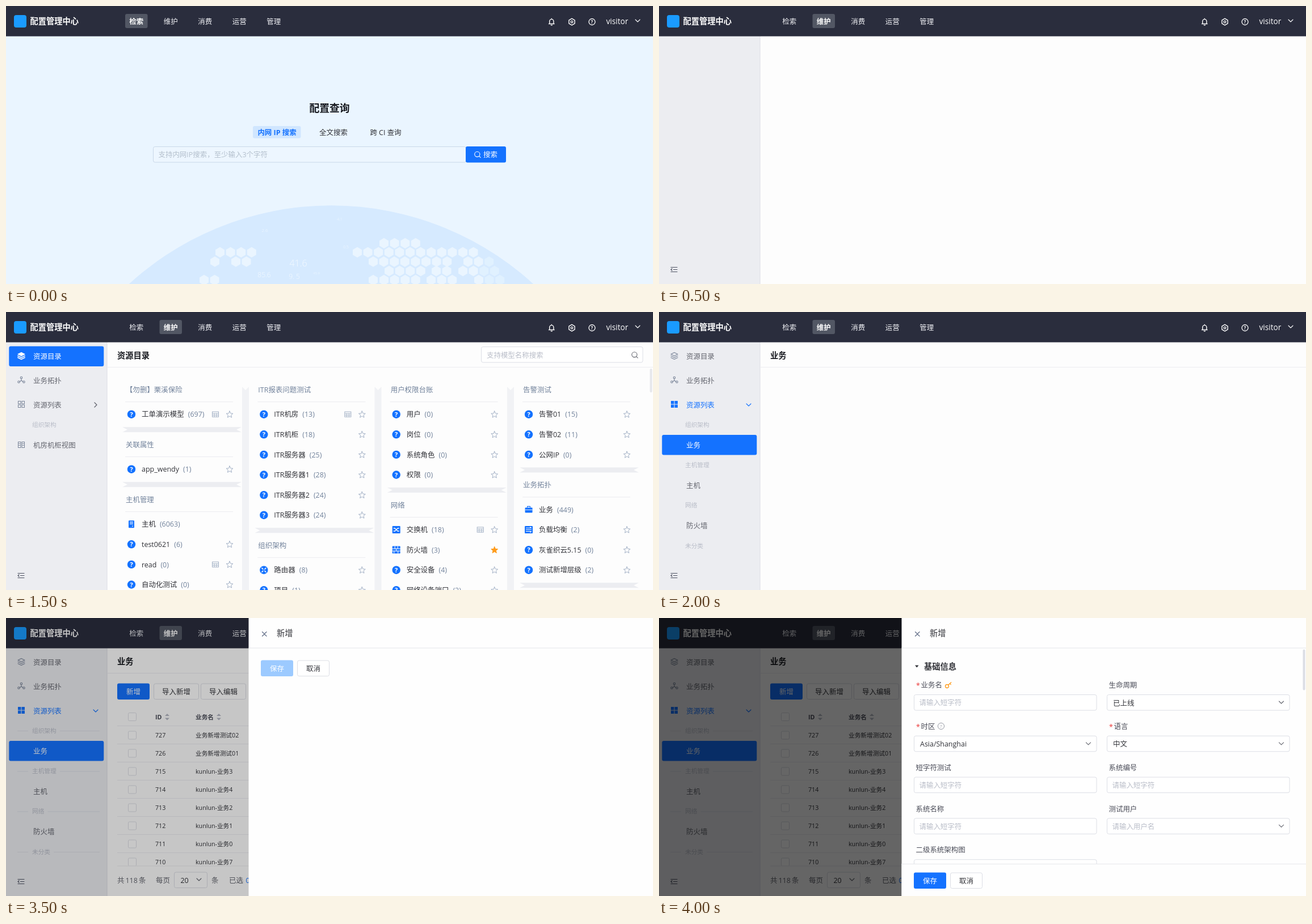
Recreate the animation shown at these times as an HTML page. Size 1140 px wide and 491 px high, loop 5000 ms.

```html
<!DOCTYPE html>
<html lang="zh-CN">
<head>
<meta charset="utf-8">
<title>配置管理中心</title>
<style>
html, body { margin: 0; width: 100%; height: 100%; overflow: hidden; background: #fdfdfd; }
svg#stage { display: block; width: 100vw; height: 100vh; }
text { font-family: "Open Sans", "Noto Sans CJK SC", "Noto Sans CJK", sans-serif; white-space: pre; }
.layer { visibility: hidden; animation: 5s step-end infinite; }
</style>
</head>
<body>
<svg id="stage" viewBox="0 0 1140 491" xmlns="http://www.w3.org/2000/svg"></svg>
<script>
const BLUE = '#1472ff', INK = '#313238', SOFT = '#63656e', PALE = '#b9bdc8', EDGE = '#dcdee5', SLATE = '#71829b';
const S = 10.68, M = 12.46, L = 14.25;
const css = [];

// Drawing helpers; y of a text is the middle of its line.
const text = (x, y, s, fill = INK, size = M, more = '') =>
  `<text x="${x}" y="${y + size * 0.37}" font-size="${size}" fill="${fill}" ${more}>${s}</text>`;
const bold = (x, y, s, fill = INK, size = M, more = '') => text(x, y, s, fill, size, 'font-weight="700" ' + more);
const mid = 'text-anchor="middle"';
const rect = (x, y, w, h, fill, stroke = 'none', r = 0) =>
  `<rect x="${x}" y="${y}" width="${w}" height="${h}" rx="${r}" fill="${fill}" stroke="${stroke}"/>`;
const path = (d, stroke, w = 1.1, fill = 'none') =>
  `<path d="${d}" stroke="${stroke}" stroke-width="${w}" fill="${fill}" stroke-linecap="round" stroke-linejoin="round"/>`;
const circle = (x, y, r, fill, stroke = 'none', w = 1.1) =>
  `<circle cx="${x}" cy="${y}" r="${r}" fill="${fill}" stroke="${stroke}" stroke-width="${w}"/>`;
const line = (x1, x2, y, c = '#ececf0') => rect(x1, y, x2 - x1, 1, c);
const at = (x, y, s) => `<g transform="translate(${x} ${y})">${s}</g>`;
const box = (x, y, w, h, r = 3) => rect(x + .5, y + .5, w - 1, h - 1, '#fff', EDGE, r);
const button = (x, y, w, s, fill, ink) =>
  (fill ? rect(x, y, w, 28.5, fill, 'none', 3) : box(x, y, w, 28.5)) + text(x + w / 2, y + 15, s, ink || INK, M, mid);
const down = (x, y, c = SOFT, r = 4) => path(`M${x - r} ${y - r / 2}l${r} ${r}l${r} ${-r}`, c);
const right = (x, y, c = SOFT, d = 1) => path(`M${x - 2 * d} ${y - 4}l${4 * d} 4l${-4 * d} 4`, c, 1.3);
const lens = (x, y, c) => circle(x - .7, y - .7, 4.6, 'none', c) + path(`M${x + 2.8} ${y + 2.8}l2.4 2.4`, c);
const polygon = (n, r1, r2, turn) => 'M' + Array.from({ length: n }, (_, i) => {
  const a = i * 2 * Math.PI / n + turn, r = i % 2 ? r2 : r1;
  return (r * Math.cos(a)).toFixed(2) + ' ' + (r * Math.sin(a)).toFixed(2);
}).join('L') + 'Z';
const star = (x, y, on) => at(x, y, path(polygon(10, 6.2, 2.8, -Math.PI / 2), on ? '#ff9c1c' : '#a3b1c6', 1, on ? '#ff9c1c' : 'none'));

// A group seen only from a to b, in ms.
function layer(a, b, s) {
  const k = 'k' + css.length, p = t => t / 50 + '%';
  css.push(`@keyframes ${k}{${a ? '0%{visibility:hidden}' : ''}${p(a)}{visibility:visible}${p(b)}{visibility:${b < 5000 ? 'hidden' : 'visible'}}}`);
  return `<g class="layer" style="animation-name:${k}">${s}</g>`;
}

/* Header */
const gear = (x, y, c) => at(x, y, path(polygon(6, 5.9, 5.9, Math.PI / 6), c, 1.4) + circle(0, 0, 1.8, 'none', c, 1.3));
function header() {
  const names = ['检索', '维护', '消费', '运营', '管理'];
  const nav = on => names.map((n, i) => {
    const x = 229.7 + i * 60.5;
    return i === on ? rect(x - 19.7, 14, 39.5, 25, '#525764', 'none', 3) + bold(x, 27, n, '#fff', M, mid)
                    : text(x, 27, n, '#f0f1f5', M, mid);
  }).join('');
  return rect(0, 0, 1140, 53.5, '#2a2d3d') + rect(14, 16, 22, 22, '#1a9bff', 'none', 4) +
    bold(42.5, 27, '配置管理中心', '#fff', L) + layer(0, 500, nav(0)) + layer(500, 5000, nav(1)) +
    path('M956.500 31.500h9.500M957.700 31v-4a3.600 3.600 0 0 1 7.200 0v4M960.300 33.700h2M961.300 22.300v1', '#fff', 1.4) +
    gear(997, 28, '#fff') + circle(1032.5, 28, 5.5, 'none', '#fff', 1.3) +
    bold(1032.5, 28, '?', '#fff', 8, mid) + text(1057.5, 27, 'visitor', '#fff', 13.6) + down(1113, 26, '#fff');
}

/* Search home */
function hexes() {
  const runs = [[419, 666, 4], [435, 377, 4], [435, 619, 12], [451.5, 368, 1], [451.5, 405, 2], [451.5, 647, 8],
    [451.5, 814, 3], [468, 675, 4], [468, 758, 2], [468, 805, 4], [484, 349, 2], [484, 647, 1], [484, 666, 4], [484, 749, 3], [484, 833, 3]];
  const d = polygon(6, 9.2, 9.2, Math.PI / 6);
  return runs.map(([y, x, n]) => Array.from({ length: n }, (_, i) => {
    const hx = x + i * 18.6;
    return `<path d="${d}" transform="translate(${hx} ${y})" opacity="${hx > 840 ? .55 : 1}"/>`;
  }).join('')).join('');
}
function home() {
  const nums = [[515, 454, '41.6', 16], [455, 475, '85.6', 12], [508, 478, '9. 5', 12], [456, 396, '2.6', 8],
    [588, 376, '4.1', 7], [599, 425, '0.5', 7], [547, 472, '45.9', 6]];
  return rect(0, 53, 1140, 438, '#eaf5ff') + circle(573, 879, 526.7, '#d6eaff') +
    `<g fill="#eaf5ff">${hexes()}</g>` +
    nums.map(([x, y, s, z]) => text(x, y, s, '#f4faff', z, mid + ' font-weight="300"')).join('') +
    bold(570, 180, '配置查询', '#17191f', 17.8, mid) +
    rect(435, 212, 84.5, 21.5, '#d0e6ff', 'none', 3) + bold(477.5, 223, '内网 IP 搜索', BLUE, M, mid) +
    text(577, 223, '全文搜索', INK, M, mid) + text(669, 223, '跨 CI 查询', INK, M, mid) +
    rect(259.5, 248.5, 551, 27.5, '#edf6ff', '#c9d8e8', 3) +
    text(268.5, 262, '支持内网IP搜索，至少输入3个字符', '#b3bfcc') +
    rect(810, 248, 71, 28.5, BLUE, 'none', 3) + lens(831, 262.5, '#fff') + text(841, 262.5, '搜索', '#fff');
}

/* Sidebar */
const icons = {
  stack: (c, f) => path('M0 -6l6 3l-6 3l-6 -3z', c, 1.1, f ? c : 'none') + path('M-6 0l6 3l6 -3M-6 3l6 3l6 -3', c, f ? 1.9 : 1.1),
  topo: c => circle(0, -4, 1.7, 'none', c) + circle(-4.5, 3.5, 1.7, 'none', c) + circle(4.5, 3.5, 1.7, 'none', c) + path('M0 -2v3l-3 2M0 1l3 2', c),
  tiles: (c, f) => [-5.5, 1].map(x => [-5.5, 1].map(y => rect(x, y, 4.5, 4.5, f ? c : 'none', c)).join('')).join(''),
  rack: c => rect(-5.5, -5, 4.5, 10, 'none', c) + rect(1, -5, 4.5, 10, 'none', c) + path('M-4.500 -2h2.500M-4.500 1h2.500M2 -2h2.500M2 1h2.500', c, .9)
};
const item = (icon, y, s, c = SOFT, full) => at(27, y - 1, icons[icon](c === SOFT ? '#7a8599' : c, full)) + text(48, y, s, c);
const pill = y => rect(5.3, y - 18, 167, 35.6, BLUE, 'none', 3);
const label = (y, s) => text(46, y, s, PALE, S);
function sidebar() {
  const top = pill(78.5) + item('stack', 78.5, '资源目录', '#fff', 1) + item('topo', 121, '业务拓扑') +
    item('tiles', 164, '资源列表') + right(158, 164);
  const groups = [[199, '组织架构'], [270.5, '主机管理'], [341.5, '网络'], [413, '未分类']];
  const list = item('stack', 78.5, '资源目录') + item('topo', 121, '业务拓扑') + item('tiles', 164, '资源列表', BLUE, 1) +
    down(158, 164, BLUE) + groups.map(g => label(...g)).join('') + pill(235) + text(48, 235, '业务', '#fff') +
    text(48, 306, '主机', SOFT) + text(48, 377.5, '防火墙', SOFT);
  const rules = groups.map(([y, s]) => line(20, 39, y, EDGE) + line(52 + s.length * S, 165, y, EDGE)).join('');
  return rect(0, 53, 178, 438, '#ecedf1') + rect(177.5, 53, 1, 438, EDGE) +
    path('M21 461.500h11M25.500 465.500h6.500M21 469.500h11M23 463.700l-2 1.800l2 1.800', '#4d5262', 1.2) +
    layer(1000, 1500, top + item('rack', 206.5, '机房机柜视图')) +
    layer(1500, 2000, top + label(199, '组织架构') + item('rack', 235.5, '机房机柜视图')) +
    layer(2000, 5000, list) + layer(3500, 5000, rules);
}
const title = s => bold(196, 76.6, s, '#17191f', L) + line(178, 1140, 97);

/* Catalogue: name, count, icon, marks (g grid, s star, f filled star) */
const columns = [
  [['【勿删】栗溪保险', ['工单演示模型', 697, 'ask', 'gs']], ['关联属性', ['app_wendy', 1, 'ask', 's']],
    ['主机管理', ['主机', 6063, 'host', ''], ['test0621', 6, 'ask', 's'], ['read', 0, 'ask', 'gs'], ['自动化测试', 0, 'ask', 's']]],
  [['ITR报表问题测试', ['ITR机房', 13, 'ask', 'gs'], ['ITR机柜', 18, 'ask', 's'], ['ITR服务器', 25, 'ask', 's'],
    ['ITR服务器1', 28, 'ask', 's'], ['ITR服务器2', 24, 'ask', 's'], ['ITR服务器3', 24, 'ask', 's']],
    ['组织架构', ['路由器', 8, 'router', 's'], ['项目', 1, 'ask', 's']]],
  [['用户权限台账', ['用户', 0, 'ask', 's'], ['岗位', 0, 'ask', 's'], ['系统角色', 0, 'ask', 's'], ['权限', 0, 'ask', 's']],
    ['网络', ['交换机', 18, 'swap', 'gs'], ['防火墙', 3, 'wall', 'f'], ['安全设备', 4, 'ask', 's'], ['网络设备端口', 2, 'ask', 's']]],
  [['告警测试', ['告警01', 15, 'ask', 's'], ['告警02', 11, 'ask', 's'], ['公网IP', 0, 'ask', 's']],
    ['业务拓扑', ['业务', 449, 'case', ''], ['负载均衡', 2, 'load', 's'], ['灰雀织云5.15', 0, 'ask', 's'], ['测试新增层级', 2, 'ask', 's']]]
];
const block = rect(-7, -6.5, 14, 13, BLUE, 'none', 1);
const marks = {
  ask: circle(0, 0, 7.2, BLUE) + bold(0, 0, '?', '#fff', 11, mid),
  host: rect(-5, -6.5, 10, 13, BLUE, 'none', 1) + path('M-2.500 -3.500h5M-2.500 -.5h5M1.500 3.500h1', '#fff', 1.2),
  router: circle(0, 0, 7.2, BLUE) + path('M-3.500 -3.500l2 2M3.500 -3.500l-2 2M-3.500 3.500l2 -2M3.500 3.500l-2 -2', '#fff', 1.6),
  swap: block + path('M-4.500 -2.500h2l5 5h2M-4.500 2.500h2l5 -5h2', '#fff', 1.3),
  wall: block + path('M-7 -2h14M-7 2h14M-2.500 -6v4M2.500 -6v4M0 -2v4M-4 2v4M3 2v4', '#fff', 1),
  load: block + path('M-4.500 -3h9l-2 -1.500M4.500 0h-9M-4.500 3h9l-2 1.500', '#fff', 1.1),
  case: rect(-6.5, -3.5, 13, 9, BLUE, 'none', 1) + path('M-2.500 -4v-1.500h5v1.500', BLUE, 1.2) + path('M-6 .5h12', '#fff', .9)
};
const table = (x, y) => at(x, y, rect(-5.5, -4.5, 11, 9, 'none', '#a3b1c6') + path('M-5 -1.500h10M-5 1.500h10M-2 -1.500v6M2 -1.500v6', '#a3b1c6', .9));
// Divider with notched ends
const bar = (x, y, w) => path(`M${x} ${y - 4.5}H${x + w}l-9 4.500l9 4.500H${x}l9 -4.500z`, 'none', 0, '#ecedf1');
function walk(draw) {
  return columns.map((cards, c) => {
    const x = 210 + c * 233.35;
    let y = 137.2, out = '';
    cards.forEach(([head, ...rows]) => {
      const first = y + 43.5;
      out += draw.head(x, y, head) + rows.map((r, i) => draw.row(x, first + i * 35.6, r)).join('');
      y = first + (rows.length - 1) * 35.6 + 53.5;
      out += draw.end ? draw.end(x, y - 26.5) : '';
    });
    return out;
  }).join('');
}
function catalog() {
  const gutters = [415, 648.5, 882].map(x =>
    path(`M${x + 1} 132l6 6l6 -6v359h-12z`, 'none', 0, '#f1f2f5')).join('');
  const full = gutters + walk({
    head: (x, y, s) => text(x + 1, y, s, SLATE) + line(x, x + 190, y + 21),
    row: (x, y, [name, n, icon, m]) => at(x + 11, y, marks[icon]) +
      text(x + 29, y, `${name}<tspan dx="7" fill="${SLATE}">(${n})</tspan>`) +
      (m.includes('g') ? table(x + 159, y) : '') + (m ? star(x + 184, y + .5, m === 'f') : ''),
    end: (x, y) => bar(x - 5, y, 210)
  });
  const faint = `<g opacity=".075">${walk({ head: () => '', row: (x, y, r) => text(x + 29, y, r[0]) })}</g>`;
  return layer(1000, 2000, title('资源目录') + box(837, 61, 285.5, 28.5) +
      text(847, 76, '支持模型名称搜索', PALE) + lens(1108, 76, SOFT) + rect(1134.5, 100, 4, 42, '#e6e7eb', 'none', 2)) +
    layer(1000, 1500, faint) + layer(1500, 2000, full);
}

/* Business table */
function business() {
  const check = y => box(215, y - 7.5, 15, 15, 2);
  const sort = x => path(`M${x - 4} 173h8l-4 -4zM${x - 4} 176.500h8l-4 4z`, 'none', 0, '#b3b7c2');
  const heads = [[263, 'ID', 284], [334, '业务名', 375], [441, '时区', 471.5], [548, '用户-字段', 604],
    [655, '运维人员', 706.5], [762, '产品人员', 813.5], [868.5, '语言', 899], [975.5, '测试-数字', 1031.5]];
  const ids = [727, 726, 715, 714, 713, 712, 711, 710], tails = [3, 4, 2, 1, 0, 7];
  const admin = 'admin(超级管...';
  const rows = ids.map((id, i) => {
    const y = 207 + i * 32, own = i < 2;
    const cells = [id, own ? '业务新增测试0' + (2 - i) : 'kunlun-业务' + tails[i - 2], 'Asia/Shanghai', '--',
      own ? 'guestone(gu...' : admin, own ? '--' : admin, '中文', '--'];
    return check(y) + cells.map((s, j) => text(heads[j][0], y, s, INK, S)).join('') +
      text(1082, y, '已上线', INK, S) + line(196, 1122, y + 15);
  }).join('');
  const pages = [1, 2, 3, 4, 5, 6].map((n, i) => text(792 + i * 32.2, 463.5, n, i ? SOFT : BLUE, M, mid)).join('');
  const foot = [[196, '共'], [210.5, '118'], [234, '条'], [264, '每页'], [362, '条'], [393, '已选'], [435, '条'], [1017, '前往'], [1110, '页']];
  const body = button(196, 115.5, 57, '新增', BLUE, '#fff') + button(260, 115.5, 80, '导入新增') + button(343, 115.5, 80, '导入编辑') +
    box(430, 115.5, 96, 28.5) + text(444, 130.5, '更多操作') + down(505, 131) +
    box(730, 115.5, 356.5, 28.5) + rect(811, 116, 1, 28, EDGE) + rect(1001.5, 116, 1, 28, EDGE) +
    text(741, 130, '业务名') + down(797, 129.5) + text(820, 130, '搜索', PALE) + lens(987, 130, SOFT) +
    box(1007.5, 123, 14.5, 14.5, 2) + text(1029, 130.5, '精确搜索') + box(1093, 115.5, 29.5, 28.5) +
    path('M1103 127a5.300 5.300 0 1 1 -.5 4.500M1102.500 125.500v2h2M1107.500 127.500v3.500l2.500 1.500', '#4d5262', 1.2) +
    check(174.5) + heads.map(([x, s, a]) => bold(x, 174.8, s, '#494b57', S) + sort(a)).join('') +
    rect(1081, 159, 5, 31, '#e3e5ea') +
    `<svg x="1081" y="160" width="5" height="30">${bold(1, 14.8, '生', '#494b57', S)}</svg>` + gear(1104, 175, '#7a8599') +
    line(196, 1122, 190) + rows + rect(179, 437.5, 961, 53.5, '#fdfdfd') + line(196, 1122, 437.5) +
    foot.map(([x, s]) => text(x, 463.5, s, SOFT)).join('') + text(422.5, 463.5, '0', BLUE) +
    box(296, 448.5, 59, 28.5) + text(307.5, 463, '20') + down(340, 462) +
    right(761, 463.5, '#b3b7c2', -1) + pages + right(985, 463.5, SOFT) + box(1049, 448.5, 53.5, 28.5) + text(1059, 463, '1');
  return layer(2000, 5000, title('业务')) + layer(2500, 5000, body);
}

/* Drawer form */
function drawer() {
  const base = rect(427.5, 0, 712.5, 491, '#fefefe') + line(427.5, 1140, 52.5, '#e6e7eb') +
    path('M451.500 24.500l7.500 7.500M459 24.500l-7.500 7.500', '#5f6b85', 1.2) + text(477, 27, '新增', INK, L);
  const ask = '请输入短字符';
  // label, hint, value, required, drop-down
  const fields = [['业务名', ask, '', 1], ['生命周期', '', '已上线', 0, 1], ['时区', '', 'Asia/Shanghai', 1, 1], ['语言', '', '中文', 1, 1],
    ['短字符测试', ask], ['系统编号', ask], ['系统名称', ask], ['测试用户', '请输入用户名', '', 0, 1], ['二级系统架构图', '']];
  const form = fields.map(([name, hint, value, must, drop], i) => {
    const x = i % 2 ? 789 : 449, y = 118.5 + (i >> 1) * 72.8;
    return (must ? text(x + 4, y + 1, '*', '#ea3636') : '') + text(x + (must ? 12.5 : 3.5), y, name, '#494b57') +
      box(x, y + 16.5, 322.5, 28.5) +
      (value ? text(x + 11, y + 31.5, value) : text(x + 9.5, y + 31, hint, PALE)) + (drop ? down(x + 307.5, y + 30.5) : '');
  }).join('');
  const key = circle(507.5, 120.5, 3, 'none', '#ff9c1c', 1.3) + path('M509.700 118.300l5 -4.500M512.500 115.800l1.800 1.800', '#ff9c1c', 1.3);
  const help = circle(497, 191, 5.6, 'none', '#979ba5', 1) + text(497, 191, '?', '#979ba5', 8, mid);
  return layer(3500, 4000, rect(0, 0, 1140, 491, 'rgba(0,0,0,.22)')) + layer(4000, 5000, rect(0, 0, 1140, 491, 'rgba(0,0,0,.6)')) +
    layer(3500, 5000, base) +
    layer(3500, 4000, button(449, 74.6, 57, '保存', '#9ccaff', '#fff') + button(513, 74.6, 57, '取消')) +
    layer(4000, 5000, path('M451 83.500h6.500l-3.250 4z', 'none', 0, INK) + bold(467, 86, '基础信息', INK, L) + form + key + help +
      rect(427.5, 434, 712.5, 57, '#fefefe') + line(427.5, 1140, 434, '#e6e7eb') +
      button(449, 449.5, 57, '保存', BLUE, '#fff') + button(513, 449.5, 57, '取消') + rect(1134.5, 55.5, 4, 72, EDGE, 'none', 2));
}

const scene = rect(0, 0, 1140, 491, '#fdfdfd') +
  layer(500, 5000, sidebar()) + catalog() + business() + layer(0, 500, home()) + header() + drawer();
const sheet = document.createElement('style');
sheet.textContent = css.join('\n');
document.head.append(sheet);
document.getElementById('stage').innerHTML = scene;
</script>
</body>
</html>
```
